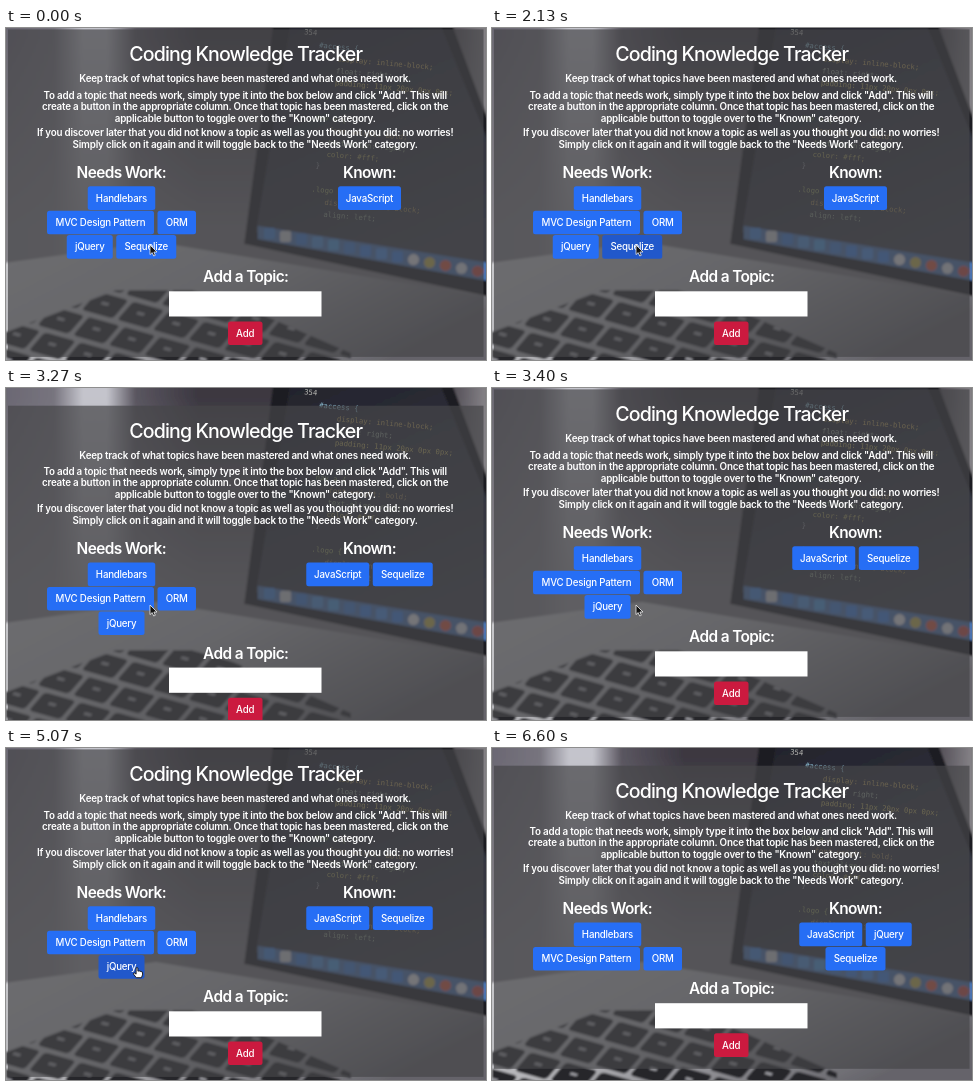
Recreate the animation shown at these times as an HTML page. Size 480 px wide and 332 px high, loop 6.67 s.

```html
<!DOCTYPE html>
<html lang="en">
<head>
<meta charset="utf-8">
<title>Coding Knowledge Tracker</title>
<style>
html, body { margin: 0; width: 100%; height: 100%; overflow: hidden; background: #777; }
svg { display: block; width: 480px; height: 332px; }
text { font-family: Inter, Roboto, sans-serif; font-optical-sizing: none; text-anchor: middle; fill: #fff; }
.h1 { font-size: 19.6px; font-weight: 550; letter-spacing: -.045em; }
.h2 { font-size: 15.4px; font-weight: 600; letter-spacing: -.04em; }
.p { font-size: 9.8px; font-weight: 600; letter-spacing: -.021em; }
.btn { font-size: 9.7px; font-weight: 500; letter-spacing: -.02em; }
.code text { font: 7.3px "DejaVu Sans Mono", monospace; text-anchor: start; }
</style>
</head>
<body>
<svg viewBox="0 0 480 332">
  <defs>
    <linearGradient id="wall">
      <stop offset="0" stop-color="#6b6873"/>
      <stop offset=".1" stop-color="#77747e"/>
      <stop offset=".16" stop-color="#c4c4cc"/>
      <stop offset=".21" stop-color="#c4c4cc"/>
      <stop offset=".27" stop-color="#5a5660"/>
      <stop offset=".4" stop-color="#3c3841"/>
      <stop offset=".9" stop-color="#3c3841"/>
      <stop offset="1" stop-color="#858287"/>
    </linearGradient>
    <linearGradient id="haze" x2="0" y2="1">
      <stop offset=".05" stop-color="#8d8b90" stop-opacity="0"/>
      <stop offset=".6" stop-color="#8d8b90" stop-opacity=".75"/>
    </linearGradient>
    <linearGradient id="screen" x2=".4" y2="1">
      <stop offset="0" stop-color="#22222b"/>
      <stop offset="1" stop-color="#3a3c47"/>
    </linearGradient>
    <linearGradient id="body" x2="1" y2=".5">
      <stop offset="0" stop-color="#cbcbce"/>
      <stop offset=".45" stop-color="#b4b4b8"/>
      <stop offset="1" stop-color="#65646a"/>
    </linearGradient>
    <clipPath id="deck"><path d="M0 304L110 262 200 262 345 325V341H0z"/></clipPath>
    <filter id="soft"><feGaussianBlur stdDeviation=".8"/></filter>
  </defs>
  <g id="photo" filter="url(#soft)">
    <path d="M0-9H480V341H0z" fill="url(#wall)"/>
    <path d="M-9-9H489V341H-9z" fill="url(#haze)"/>
    <path d="M-9 236L150 214 489 270V341H-9z" fill="url(#body)"/>
    <path d="M268-9H444L489 110V270L238 216z" fill="#1d1c21"/>
    <path d="M285-9H432L489 130V252L250 204z" fill="url(#screen)"/>
    <path d="M252 198L489 236V254L252 211z" fill="#4a72ae"/>
    <g id="icons"></g>
    <g id="keys" clip-path="url(#deck)"></g>
  </g>
  <g class="code" id="code" transform="translate(295 6) rotate(5)"></g>
  <g id="page"></g>
  <g id="cursor" stroke-linejoin="round"></g>
</svg>
<script>
const $ = id => document.getElementById(id);
const rect = (x, y, w, h, fill, r = 0) =>
  `<rect x="${x}" y="${y}" width="${w}" height="${h}" rx="${r}" fill="${fill}"/>`;
const text = (cls, x, y, s) => `<text class="${cls}" x="${x}" y="${y}">${s}</text>`;
const ramp = (t, a, b) => Math.min(1, Math.max(0, (t - a) / (b - a)));
const ease = p => p * p * (3 - 2 * p);

// Backdrop: keyboard, dock and code
let keys = '';
for (let r = 0; r < 6; r++)
  for (let c = -2; c < 12; c++)
    keys += rect(c * 37 + r * 11, r * 31, 33, 26, '#26262b', 4) +
      rect(c * 37 + r * 11 + 12, r * 31 + 10, 7, 3, '#a0a0a6');
$('keys').innerHTML = `<g transform="matrix(.96 .27 -.62 .72 100 238)">${keys}</g>`;

const dock = ['#4384d8', '#c9ccd2', '#3a78d0', '#4f8fd8', '#4b96dd', '#3f7bd0', '#3c7fe0',
  '#4a8ce4', '#3c7fe0', '#e4e4e8', '#c4b24e', '#d8583a', '#dadde4', '#c94b3f'];
$('icons').innerHTML = dock.map((c, i) =>
  rect(258 + i * 16, 200 + i * 2.9, 11, 11, c, i > 8 ? 5.5 : 2)).join('');

const code = [
  ['354', 3, '#b8b8b4'], ['#access {', 19, '#8fc3d8'], ['display: inline-block;', 38, '#c0a45c'],
  ['float: right;', 38, '#9aa89a'], ['padding: 11px 20px 0px 0px;', 38, '#c0b060'],
  ['}', 26, '#99a0a0'], ['', 0, ''], ['nav a {', 22, '#92a86a'],
  ['font-weight: bold;', 36, '#a08a5c'], ['text-align: right;', 36, '#8ca07c'],
  ['color: #fff;', 36, '#a9a05c'], ['}', 26, '#8f949c'], ['', 0, ''],
  ['.logo {', 24, '#9aa463'], ['display: inline-block;', 38, '#a08a55'], ['align: left;', 38, '#8b9a86']
];
$('code').innerHTML = code.map(([s, x, c], i) =>
  `<text x="${x}" y="${i * 12}" style="fill:${c}">${s}</text>`).join('');

// Page
const widths = { Handlebars: 67.5, 'MVC Design Pattern': 107, ORM: 38.5, jQuery: 46, Sequelize: 60, JavaScript: 63 };
const lines = [
  [54.3, 'Keep track of what topics have been mastered and what ones need work.'],
  [70.8, 'To add a topic that needs work, simply type it into the box below and click "Add". This will'],
  [82.2, 'create a button in the appropriate column. Once that topic has been mastered, click on the'],
  [93.8, 'applicable button to toggle over to the "Known" category.'],
  [108, 'If you discover later that you did not know a topic as well as you thought you did: no worries!'],
  [119.8, 'Simply click on it again and it will toggle back to the "Needs Work" category.']
];
const firstRows = [['Handlebars'], ['MVC Design Pattern', 'ORM']];
const scenes = [
  { from: 0, needs: [...firstRows, ['jQuery', 'Sequelize']], known: [['JavaScript']] },
  { from: 3200, needs: [...firstRows, ['jQuery']], known: [['JavaScript', 'Sequelize']] },
  { from: 5270, needs: firstRows, known: [['JavaScript', 'jQuery'], ['Sequelize']] }
];
const rowStep = 24.4, maxScroll = 16.3, loop = 6670;

const shade = p => {
  const mix = (a, b) => Math.round(a + (b - a) * p);
  return `rgb(${mix(38, 33)},${mix(110, 88)},${mix(245, 203)})`;
};

function buttons(rows, center, hot, heat) {
  return rows.map((row, i) => {
    const gap = 3.5, y = 158.3 + i * rowStep;
    let x = center - row.reduce((sum, s) => sum + widths[s] + gap, -gap) / 2;
    return row.map(s => {
      const w = widths[s];
      const out = rect(x, y, w, 23.6, shade(s === hot ? heat : 0), 2.5) +
        text('btn', x + w / 2, y + 15.2, s);
      x += w + gap;
      return out;
    }).join('');
  }).join('');
}

function page(scene, scroll, hot, heat) {
  const drop = (scene.needs.length - 3) * rowStep;
  return `<g transform="translate(0 ${maxScroll - scroll})">` +
    rect(2, 1.4, 475.5, 327.5 + drop, 'rgba(70,70,73,.7)') +
    text('h1', 239.7, 33.4, 'Coding Knowledge Tracker') +
    lines.map(([y, s]) => text('p', 239.2, y, s)).join('') +
    text('h2', 115.3, 150, 'Needs Work:') + text('h2', 363.5, 150, 'Known:') +
    buttons(scene.needs, 115.5, hot, heat) + buttons(scene.known, 363.5, hot, heat) +
    `<g transform="translate(0 ${drop})">` +
    text('h2', 239.7, 254.3, 'Add a Topic:') +
    rect(163, 263.3, 152.5, 25.2, '#fff') +
    rect(222, 293.4, 34.5, 23.6, '#cb1a3f', 2.5) + text('btn', 239.2, 308.7, 'Add') +
    '</g></g>';
}

const arrow = '<path d="M0 0V9.6L2.2 7.6 3.7 11 5.3 10.3 3.9 7H7z" fill="#111" stroke="#eee" stroke-width=".8"/>';
const hand = '<path d="M-.9.5Q0-.6.9.5V3.6L2.5 3.5 4 4 5.5 4.7V7.4L4.4 10.2H-.7L-3.5 6.6Q-3.7 5.2-2.4 5.5L-.9 6.6z" fill="#fff" stroke="#111" stroke-width=".9"/>';

function cursor(t) {
  if (t >= 6560) return '';
  const left = ease(ramp(t, 3600, 3930)), away = ease(ramp(t, 6070, 6560));
  const x = 144 - 13 * left + 100 * away, y = 217 + 2.5 * left - 235 * away;
  const pointing = t >= 1200 && t < 2100 || t >= 3870 && t < 5270 || t >= 5400 && t < 6170;
  return `<g transform="translate(${x.toFixed(2)} ${y.toFixed(2)})">${pointing ? hand : arrow}</g>`;
}

let shown = '';
function draw(t) {
  const n = scenes.filter(s => t >= s.from).length - 1;
  const hot = ['Sequelize', 'jQuery', 'MVC Design Pattern'][n];
  const heat = [ramp(t, 1130, 1330), ramp(t, 3800, 3950), ramp(t, 5320, 5460) - ramp(t, 6170, 6320)][n];
  const scroll = t < 3200 || t >= 3330 && t < 5270 ? maxScroll : 0;
  const next = page(scenes[n], scroll, hot, heat);
  if (next !== shown) $('page').innerHTML = shown = next;
  $('cursor').innerHTML = cursor(t);
}

const start = performance.now();
function frame() {
  draw((performance.now() - start) % loop);
  requestAnimationFrame(frame);
}
frame();
</script>
</body>
</html>
```
